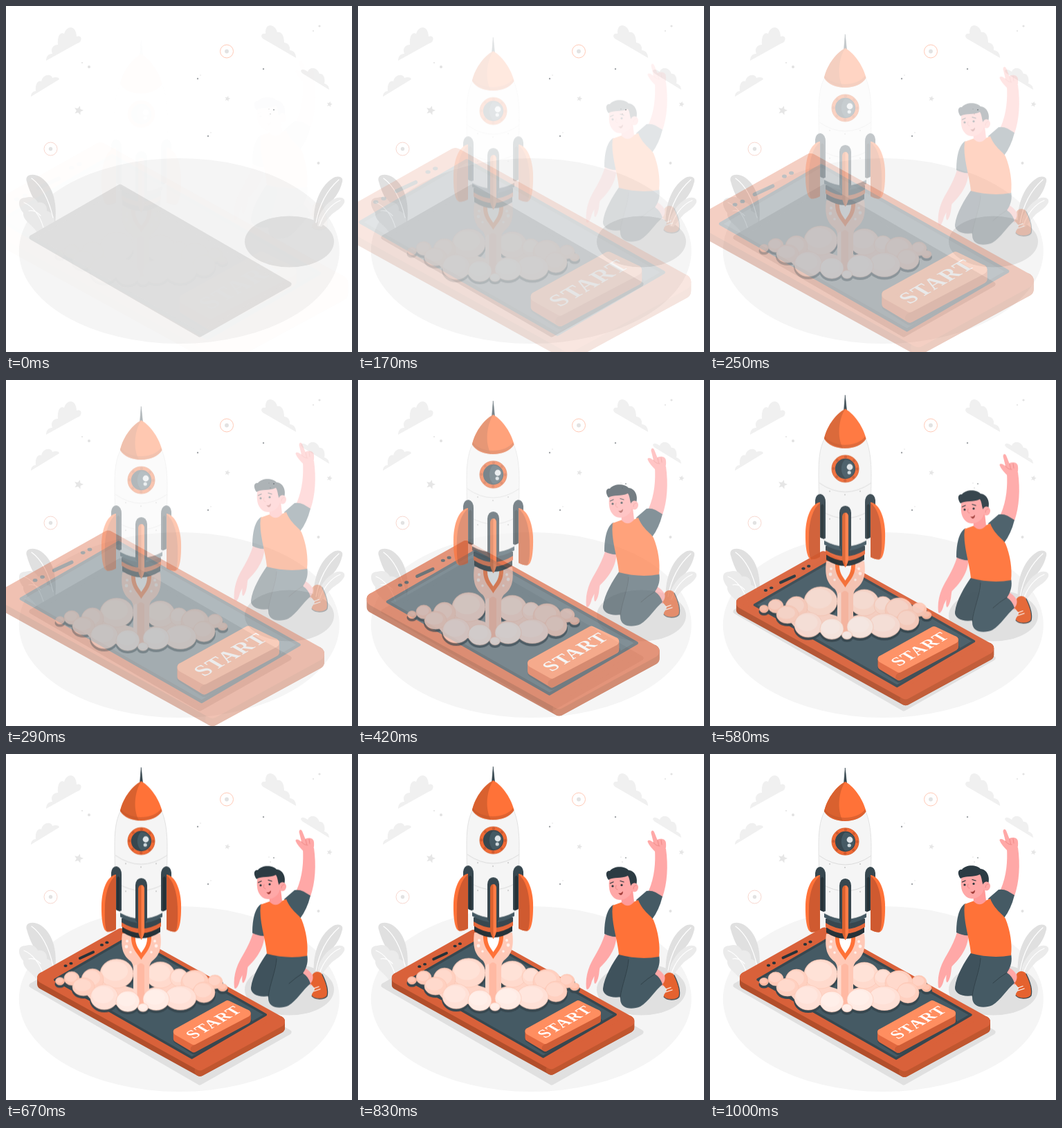
Recreate the animation shown at these times as an HTML page. Size 500 by 500 pixels, loop 1.04 s.

```html
<!DOCTYPE html>
<html lang="en">
<head>
<meta charset="utf-8">
<title>Rocket launch</title>
<style>
  html, body { margin: 0; width: 100%; height: 100%; overflow: hidden; background: #fff; }
  svg { display: block; width: 100vw; height: 100vh; }
  #phone { transform-origin: 224px 358.5px; }
  .round { stroke-linejoin: round; stroke-linecap: round; }
  .line { fill: none; stroke-linecap: round; }
  #start { font: bold 24px "Liberation Serif", "Noto Serif", serif; letter-spacing: 1.2px; }
</style>
</head>
<body>
<svg viewBox="0 0 500 500">
  <g id="backdrop">
    <ellipse cx="250.3" cy="354" rx="231.5" ry="134" fill="#f5f5f5"/>
    <g fill="#f0f0f0">
      <path d="M58 79C58 73 61 69 67 69C64 62 68 56 75 56C74 44 78 37 84 40C88 28 101 27 102 44C107 42 110 46 108 50Q107 53 103 54Z"/>
      <path d="M36 131C36 126 39 123 43 123C42 113 46 107 51 109C53 99 65 97 67 104C72 102 77 103 77 106Z"/>
      <path d="M419 75C419 69 416 64 410 64C411 57 407 53 402 53C402 43 398 36 392 38C389 26 374 23 375 40C370 39 367 43 371 47Z"/>
      <path d="M467 121C467 116 464 113 460 112C462 103 458 97 453 98C449 87 438 88 436 95C432 92 427 90 426 94Q427 97 431 99Z"/>
    </g>
    <g fill="none" stroke="#ffc3ae" stroke-width=".9">
      <circle cx="319" cy="65.5" r="9.5"/>
      <circle cx="64.5" cy="206.5" r="9.5" stroke="#f6d3ca"/>
    </g>
    <g id="specks"></g>
    <ellipse cx="409.5" cy="340.5" rx="64.5" ry="37" fill="#e0e0e0"/>
    <path d="M71 314C74 288 70 262 51 248C40 241 28 243 29.5 252C35 272 42 285 53 294C60 300 65 306 67 315Z" fill="#e0e0e0"/>
    <path d="M45 327C38 316 24 310 25 299C17 289 16 277 28 277C38 274 43 278 46 284C55 282 60 289 59 296C67 298 71 306 70 313L52 325Z" fill="#ebebeb"/>
    <path d="M445 318C443 290 452 262 472 249C480 244 488 247 486 254C482 270 474 280 462 290C454 298 450 308 450 318Z" fill="#e0e0e0"/>
    <path d="M450 318C452 300 462 284 476 278C484 275 491 278 489 284C485 293 476 296 470 302C464 308 460 314 456 319Z" fill="#ebebeb"/>
    <g class="line" stroke="#fff" stroke-width="1.2">
      <path d="M37 249C52 260 62 280 68 306M26 284C38 289 49 302 54 320M33 296Q42 294 50 303"/>
      <path d="M481 251C464 266 453 285 448 313M483 281C468 287 458 302 453 317"/>
    </g>
    <path class="round" d="M37 334.5L165 261L409 402L280 475Z" fill="#e0e0e0" stroke="#e0e0e0" stroke-width="7"/>
  </g>

  <g id="phone">
    <g class="round" stroke-width="16">
      <path d="M51 323V332L281 459L397 396V387Z" fill="#b24e2b" stroke="#b24e2b"/>
      <path d="M281 459L397 396V387" fill="none" stroke="#c0562f"/>
      <path d="M51 323L165.5 258.5L397 387L281 450.5Z" fill="#d9613a" stroke="#d9613a"/>
    </g>
    <path class="round" d="M69 326L177 263.5L377 377L269 440Z" fill="#455a64" stroke="#37474f" stroke-width="3.5"/>
    <path class="line" d="M105.5 294.5L125 285.5" stroke="#263238" stroke-width="4"/>
    <g fill="#263238">
      <ellipse cx="84.5" cy="305.5" rx="2.6" ry="1.9"/>
      <ellipse cx="92.5" cy="302" rx="2.6" ry="1.9"/>
      <ellipse cx="137.5" cy="275" rx="2.6" ry="1.9"/>
      <ellipse cx="145" cy="271.5" rx="2.6" ry="1.9"/>
    </g>
    <g class="round" stroke-width="10">
      <path d="M247 402V414L272 430L352 387L321 361Z" fill="#37474f" stroke="#37474f"/>
      <path d="M247 402V412L272 427L350 385V375Z" fill="#e2683f" stroke="#e2683f"/>
      <path d="M272 427L350 385V375" fill="none" stroke="#cf5d36"/>
      <path d="M247 402L321 361L350 375L272 416Z" fill="#ff8e60" stroke="#ff8e60"/>
    </g>
    <text id="start" transform="matrix(.866 -.5 .866 .5 300.5 388)" x=".6" y="8" text-anchor="middle" fill="#fff">START</text>
  </g>

  <g id="rocket">
    <g id="smokeShade" fill="#37474f"></g>
    <path d="M105 335Q150 322 195 345Q245 322 292 335L270 358Q195 372 125 358Z" fill="#ffd5c7"/>
    <g id="smokeBack"></g>
    <path d="M168 260C165 284 171 293 180 300Q184 304 184 312V362Q195 372 207 362V312Q207 304 211 300C220 293 226 284 223 260Z" fill="#ffc9b7"/>
    <path d="M190 306Q195 300 200 306V366H190Z" fill="#ffb9a3"/>
    <path d="M184 312Q184 305 189 305V365L184 362Z" fill="#ffd9cd"/>
    <path d="M181 262C180 282 190 288 195.5 298C201 288 211 282 210 262Z" fill="#ff7238"/>
    <path d="M187 262C186 276 191 281 195.5 288C200 281 205 276 204 262Z" fill="#fff"/>
    <g fill="#fff0ea">
      <circle cx="175" cy="271" r="2"/><circle cx="174" cy="279" r="2.4"/><circle cx="180" cy="287" r="1.8"/>
      <circle cx="215" cy="271" r="2"/><circle cx="217" cy="278" r="2.4"/><circle cx="210" cy="287" r="1.8"/>
    </g>
    <g id="smokeFront"></g>

    <path d="M168 246V258Q195.5 276 223 258V246Z" fill="#263238"/>
    <path d="M167 240V250Q195.5 269 224 250V240Z" fill="#e5673a"/>
    <path d="M167 238V244Q195.5 262 224 244V238Z" fill="#37474f"/>
    <path d="M165 226V236Q195.5 254 226 236V226Z" fill="#455a64"/>
    <path d="M165.5 83C158 97 157 115 157 135C157 180 161 212 165 230Q195.5 247 226 230C230 212 233 180 233 135C233 115 231 97 225 83C215 101 175 101 165.5 83Z" fill="#f5f5f5" stroke="#dcdcdc" stroke-width=".8"/>
    <path d="M158 147Q195 173 233 147M162 188Q195 208 229 188" fill="none" stroke="#dcdcdc" stroke-width="1"/>
    <g fill="#c4c4c4">
      <circle cx="173" cy="159" r="1"/><circle cx="195" cy="164" r="1"/><circle cx="217" cy="159" r="1"/>
      <circle cx="173" cy="199" r="1"/><circle cx="217" cy="199" r="1"/>
    </g>
    <path d="M193.5 42L195.3 20L197.5 42Z" fill="#37474f" stroke="#37474f" stroke-width=".6"/>
    <path d="M195.5 40C180 48 168 68 165 83C175 101.5 215 101.5 225.5 83C222 68 210 48 195.5 40Z" fill="#ff7238"/>
    <path d="M195.5 40C180 48 168 68 165 83Q174 93 192 96.5C183 80 186 54 195.5 40Z" fill="#d9612f"/>
    <path d="M165 83C175 101.5 215 101.5 225.5 83L224 80C213 96 177 96 166 80Z" fill="#c4562a" opacity=".55"/>
    <circle cx="195.5" cy="126.5" r="19.5" fill="#f06a35" stroke="#d9612f"/>
    <circle cx="195.5" cy="126.5" r="17" class="line" stroke="#cf5a30" stroke-width="4" stroke-dasharray=".5 12.8"/>
    <circle cx="195.5" cy="126.5" r="14" fill="#455a64" stroke="#37474f" stroke-width="1.3"/>
    <path d="M195.5 112.5A14 14 0 0 0 195.5 140.5A20 20 0 0 1 195.5 112.5" fill="#37474f"/>
    <circle cx="202" cy="124" r="4.4" fill="#e0e5e8"/>
    <circle cx="201.2" cy="132" r="2.6" fill="#cfd8dc"/>
    <g id="fin">
      <path d="M152 185V172Q153 163 160 163Q167 165 167 175V227Q163 229 158 225V185Z" fill="#37474f"/>
      <path d="M160 226V180Q162 175 164.500 180V228Z" fill="#263238"/>
      <path d="M158 175C146 178 139 196 138 217C137.5 240 140 254 145 257Q151 258.5 159 254V175Z" fill="#ff7238"/>
      <path d="M159 176C149 183 143.500 202 143 222C142.500 240 143 252 146 257.5Q152 258 159 254Z" fill="#cf5a30"/>
    </g>
    <use href="#fin" transform="matrix(-1 0 0 1 391 0)"/>
    <path d="M187 241V190Q188 180 195.5 180Q203 180 204 190V241L200 246H191Z" fill="#37474f"/>
    <path d="M191 258V195Q192 190 195.5 190Q199 190 200 195V258Q198 266 195.5 269Q193 266 191 258Z" fill="#d9612f"/>
    <path d="M195.5 190Q199 190 200 195V258Q198 266 195.5 269Z" fill="#ff7d47"/>
  </g>

  <g id="boy">
    <path d="M429 136L445 135C448.5 160 447 185 440 205L420 196C429 175 430 155 429 136Z" fill="#ffa8a7"/>
    <path d="M423.5 112C424 107.5 427 108 428.5 112L432.5 122C438 119.5 445 121 445 127C445.5 133 445 137 441 139.5L430 140C425 135 420.5 130 418.5 125C418.5 121.5 422 122 427 126Z" fill="#ffa8a7"/>
    <path class="line" d="M433 123L434.5 130M438 122.5L439 129M427 126Q430 131 436 131" stroke="#ee8785" stroke-width=".9"/>
    <path d="M357 258C350 280 340 292 335 304C331 314 328.5 325 330 337C332 341 336 335 338 326L341.5 319C341 327 341 332 344 329C349 321 348 312 349.5 307C358 298 372 285 374 260Z" fill="#ffa8a7"/>
    <path d="M424 318L433 309C440 313 444 320 447 326L440 334Z" fill="#ffa8a7"/>
    <path d="M443 318C446 313 453 313 456.500 317C462 327 466 341 464 349C459 355 446 354 442 349C441 345 446 343 446 338L440 331Q445 326 443 318Z" fill="#e5622f"/>
    <path class="line" d="M457 318C462 328 466 341 464 349C459 355 446 354 442 349" stroke="#37474f" stroke-width="1.2"/>
    <path class="line" d="M445 338L452 335.500M445 342L454 339" stroke="#fff" stroke-width="1.3"/>
    <path d="M378 286L412 292C398 310 390 330 380 349C366 352 353 346 354 337C356 320 368 300 378 286Z" fill="#3f525c"/>
    <path d="M391 290C389 317 379 335 379 352C379 367 396 368 408 363C420 356 429 340 440 331Q437 321 429 316C435 308 437 298 435 289Z" fill="#455a64"/>
    <path class="line" d="M429 316Q419 322 409 331M391 295C390 313 381 332 379 350" stroke="#2f3f47" stroke-width=".9"/>
    <path d="M369 216C359 222 356 240 356 258Q366 263 375 262L374 230Z" fill="#455a64"/>
    <path d="M402 209L417 196Q424 195 430 198L440 204Q435 224 425 237C414 231 407 222 402 209Z" fill="#455a64"/>
    <path d="M368 217L382 212Q390 220 398 212L405 209C411 225 423 231 427 238C434 255 437 275 435 291Q407 296 377 288C375 265 365 240 368 217Z" fill="#ff7238"/>
    <path d="M380 202L381 213Q390 222 399 212L397 194Z" fill="#ff9a98"/>
    <path d="M364 174C361 190 363 200 370 206C376 211 388 210 394 200L400 184C396 174 388 170 380 171Z" fill="#ffa8a7"/>
    <path d="M362 180C357 173 358 166 364 167C370 159 386 160 391 166C401 167 405 178 402 188L397 191C392 188 394 180 390 174C380 179 370 175 362 180Z" fill="#2c3b43"/>
    <ellipse cx="399.5" cy="191" rx="5.5" ry="6.5" fill="#ffa8a7"/>
    <path class="line" d="M398 193Q398 188 402 188" stroke="#ee8785" stroke-width=".9"/>
    <circle cx="368" cy="189" r="1.6" fill="#263238"/>
    <circle cx="381" cy="187.5" r="1.6" fill="#263238"/>
    <path class="line" d="M364.5 185L369 183M379 181.5L384 183" stroke="#263238" stroke-width="1.3"/>
    <path class="line" d="M373 188Q371 194 375 194" stroke="#ee8785" stroke-width="1"/>
    <path d="M376 199Q380 200 383 196.5Q383 202 379 202Z" fill="#a3403c"/>
  </g>
</svg>
<script>
const byId = id => document.getElementById(id);

function add(parent, tag, attrs) {
  const el = document.createElementNS("http://www.w3.org/2000/svg", tag);
  for (const name in attrs) el.setAttribute(name, attrs[name]);
  byId(parent).append(el);
}

function star(x, y, r) {
  const points = [...Array(10).keys()].map(i => {
    const a = i * Math.PI / 5 - 1.3, d = i % 2 ? r * 0.45 : r;
    return [x + d * Math.cos(a), y + d * Math.sin(a)];
  });
  add("specks", "polygon", { points: points.join(" "), fill: "#e6e6e6" });
}

function dots(fill, list) {
  for (const [cx, cy, r] of list) add("specks", "circle", { cx, cy, r, fill });
}

star(105, 151, 7);
star(320, 134, 4.3);
star(467.5, 142, 4.3);
dots("#a3a7aa", [[277, 105, 1.2], [372, 91, 1.2], [292, 188, 1.2], [387, 150, 1]]);
dots("#e2e2e2", [[319, 65.5, 2.9], [64.5, 206.5, 2.7], [120, 88, 2], [110, 82, 1], [453, 29, 1.6],
  [444, 36, 1], [451.5, 227, 2], [281, 100, 0.8], [296, 183, 0.8], [382, 156, 0.9], [380, 149, 0.8]]);

// Each puff: centre x, centre y, rx, ry
function puffs(layer, fill, list) {
  for (const [cx, cy, rx, ry] of list) {
    add("smokeShade", "ellipse", { cx, cy: cy + 4, rx: rx + 1, ry });
    add(layer, "ellipse", { cx, cy, rx, ry, fill, stroke: "#fcc4b0", "stroke-width": 0.6 });
    add(layer, "ellipse", { cx: cx - rx * 0.1, cy: cy - ry * 0.18, rx: rx * 0.78, ry: ry * 0.68,
      fill: "#fff", opacity: 0.2 });
  }
}

puffs("smokeBack", "#ffb89f", [[78, 329, 6.5, 5.5], [313, 338, 7, 5.5]]);
puffs("smokeBack", "#ffc9b7", [[95, 325, 11, 10], [302, 330, 11, 10]]);
puffs("smokeBack", "#ffdacd", [[160, 318, 24, 21], [223, 320, 21, 19], [250, 324, 13, 13]]);
puffs("smokeBack", "#ffd0c0", [[125, 327, 16, 16], [112, 337, 16, 13], [273, 331, 20, 18], [286, 345, 16, 15]]);
puffs("smokeFront", "#ffe0d6", [[142, 352, 20, 18], [252, 353, 23, 17.5]]);
puffs("smokeFront", "#ffebe4", [[176, 358, 17, 15], [217, 355, 19, 16], [198, 367, 7.5, 6]]);

const loop = 1040, step = 1000 / 24;
const entrances = { phone: "scale(1.5)", rocket: "translateY(30px)", boy: "translateY(-30px)" };

const moves = Object.entries(entrances).map(([id, from]) => {
  const move = byId(id).animate(
    [{ opacity: 0, transform: from }, { opacity: 1, transform: "none" }],
    { duration: 1000, fill: "both", easing: "cubic-bezier(.36, -.01, .5, 1.38)" });
  move.pause();
  return move;
});

// The motion advances at 24 steps a second, with a longer first step
function draw(now) {
  const k = Math.floor((now % loop + 4) / step);
  const time = k < 2 ? step * 1.5 : Math.min((k + 1) * step, 1000);
  for (const move of moves) move.currentTime = time;
}

const begin = performance.now();
function tick() {
  draw(performance.now() - begin);
  requestAnimationFrame(tick);
}
tick();
</script>
</body>
</html>
```
